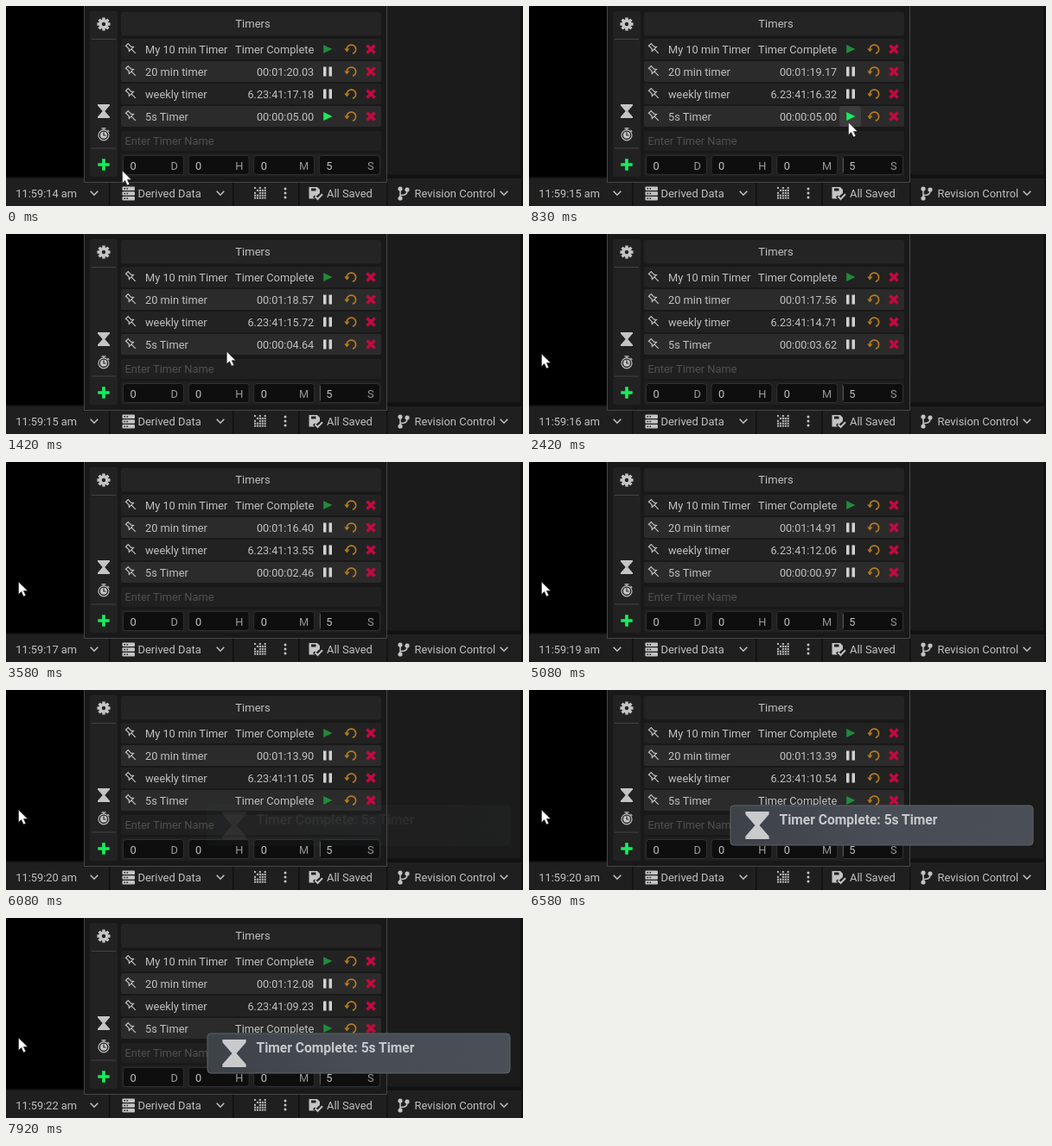
Animation of 598x232 px, one loop 8000 ms. Source, as an HTML page:

```html
<!DOCTYPE html>
<html lang="en">
<head>
<meta charset="utf-8">
<title>Timers</title>
<style>
html, body { margin: 0; width: 100%; height: 100%; overflow: hidden; background: #000; }
svg { display: block; width: 598px; height: 232px; }
text { font: 12.8px Roboto, sans-serif; fill: #c0c0c0; white-space: pre; }
.end { text-anchor: end; }
.time { text-anchor: end; font-size: 12.65px; }
.mid { text-anchor: middle; font-size: 13px; }
.bar { font-size: 12.95px; }
.hint { fill: #505050; }
.unit { fill: #9a9a9a; text-anchor: end; }
.title { font-size: 15.6px; font-weight: 700; fill: #c6c8cb; }
.line { fill: none; stroke: #c0c0c0; stroke-width: 1.6; }
.thin { fill: none; stroke: #c0c0c0; stroke-width: 1.2; }
.icon { fill: #c4c4c4; }
</style>
</head>
<body>
<svg viewBox="0 0 598 232">
  <defs>
    <linearGradient id="toastFill">
      <stop offset="0" stop-color="#3d4148"/><stop offset=".5" stop-color="#484d55"/><stop offset="1" stop-color="#4a4f57"/>
    </linearGradient>
    <path id="hourglass" d="M-7-8H7V-6.4L1.3 0L7 6.4V8H-7V6.4L-1.3 0L-7-6.4Z"/>
    <path id="play" d="M-4.8-5L5.4 0L-4.8 5Z" stroke-linejoin="round"/>
    <path id="pause" d="M-5-5.5h3.5v11h-3.5zM1.5-5.5H5v11H1.5z"/>
    <path id="cross" d="M-4.5-4.5L4.5 4.5M4.5-4.5L-4.5 4.5" stroke="#c20a40" stroke-width="3.6"/>
    <g id="reset">
      <path d="M-4.8 .5A5.2 5.2 0 1 1 2 5.2" stroke="#b47c1c" fill="none" stroke-width="1.8"/>
      <path d="M-7.8-.4H-1.6L-4.7 3.6Z" fill="#b47c1c"/>
    </g>
    <path id="pin" class="thin" d="M-2.6-6.5H2.6M-1.8-6.5V-1.6L-3.6 .6H3.6L1.8-1.6V-6.5M0 .6V7.5" transform="rotate(-45)"/>
    <path id="chevron" class="line" d="M-4.3-2.2L0 2.2L4.3-2.2"/>
  </defs>
  <g id="scene"></g>
  <g id="toast">
    <rect x="233" y="134" width="350" height="46" rx="4" fill="url(#toastFill)" stroke="#5d6269"/>
    <use href="#hourglass" transform="translate(264 157) scale(1.95 2)" fill="#c8cacc"/>
    <text class="title" x="289.5" y="155.5">Timer Complete: 5s Timer</text>
  </g>
  <path id="cursor" d="M.5 0V14.5L3.7 11.5L6.3 17L8.9 15.8L6.4 10.4H11Z" fill="#fff" stroke="#222" stroke-width=".6"/>
</svg>
<script>
const LOOP = 8000, FPS = 12;
const START_LEFT = 78.94, END_LEFT = 73.94, WEEKLY_OFFSET = 2.85;
const DIM_GREEN = '#1f8b3b', GREEN = '#14ee5c';
const $ = id => document.getElementById(id);

const rect = (x, y, w, h, fill, extra = '') =>
  `<rect x="${x}" y="${y}" width="${w}" height="${h}" fill="${fill}" ${extra}/>`;
const label = (x, y, value, cls = '', id = '') =>
  `<text x="${x}" y="${y + 4.6}" class="${cls}" id="${id}">${value}</text>`;
const use = (name, x, y, extra = '') => `<use href="#${name}" x="${x}" y="${y}" ${extra}/>`;

function row(i, name, value, icon, color) {
  const y = 50 + i * 26;
  return rect(133, y - 12, 301, 24, i % 2 ? '#2b2b2b' : '#222', 'rx="2"') +
    (i === 3 ? rect(359, y - 12, 25, 24, '#3d3d3d', 'rx="3" id="hover"') : '') +
    use('pin', 144.5, y - .5) + label(161, y, name) +
    label(356.2, y, value, value ? 'end' : 'time', 'value' + i) +
    use(icon, 372, y, `fill="${color}" id="state${i}"`) +
    use('reset', 399, y) + use('cross', 422, y);
}

function field(i, unit) {
  const x = 135.5 + i * 75.6;
  return rect(x, 173.5, 70, 22, '#0e0e0e', 'rx="3" stroke="#303030"') +
    label(x + 8, 185.2, i === 3 ? 5 : 0) + label(x + 63.4, 185.2, unit, 'unit');
}

function gear(x, y) {
  const teeth = Array.from({ length: 8 }, (_, i) =>
    `<rect x="-1.7" y="-7.6" width="3.4" height="4" transform="rotate(${i * 45})"/>`).join('');
  return `<g class="icon" transform="translate(${x} ${y})">${teeth}
    <circle r="4" fill="none" stroke="#c4c4c4" stroke-width="3.6"/></g>`;
}

function stopwatch(x, y) {
  return `<g class="thin" transform="translate(${x} ${y})"><circle r="6" cy=".8"/>
    <circle class="icon" r="4" cy=".8" stroke="none"/><path d="M-2.5-7.2H2.5M0-7V-5M4.5-5L6.3-3.2"/>
    <path d="M0-2.5V1H2.5" stroke="#222"/></g>`;
}

function dataIcon(x, y) {
  return [0, 5.7, 11.4].map(d => rect(x, y + d, 14.5, 4.6, '#c4c4c4', 'rx="1"') +
    rect(x + 2, y + d + 1.6, 1.6, 1.5, '#222') + rect(x + 5, y + d + 1.6, 1.6, 1.5, '#222')).join('');
}

function dotsIcon(x, y) {
  let out = '';
  for (let r = 0; r < 5; r++) for (let c = 0; c < 5; c++)
    if (r > 2 || (r > 0 && c > 1) || (r + c) % 2 === 0)
      out += rect(x + c * 2.9, y + r * 2.9, 2.1, 2.1, '#b4b4b4');
  return out;
}

const saveIcon = `<path class="icon" d="M350.5 210H360L363 213V217L358.5 221L357 219.5L355 221.5L357 223.5H350.5Z"/>
  <path d="M353 211.5H358.5V214.5H353Z" fill="#222"/>
  <path class="line" d="M357.5 221L360.5 224L366 218.2" style="stroke-width:2"/>`;
const branchIcon = `<path class="line" d="M456 213V223M456 219.5C463 219.5 464 217.5 464 214"/>
  <g class="icon"><circle cx="456" cy="212" r="2.6"/><circle cx="456" cy="223" r="2.6"/><circle cx="464" cy="213" r="2.6"/></g>`;

$('scene').innerHTML = [
  rect(0, 0, 598, 232, '#111'), rect(0, 0, 92, 198, '#000'),
  rect(440, 0, 155, 195.5, '#1b1b1b'),
  rect(0, 200, 596, 32, '#1f1f1f'),
  [119, 262, 338, 440].map(x => rect(x, 204, 1.5, 28, '#111')).join(''),
  label(11.3, 217.3, '', '', 'clock'), use('chevron', 102, 217),
  dataIcon(134.5, 209.5), label(152.5, 217.3, 'Derived Data', 'bar'), use('chevron', 248, 217),
  dotsIcon(287, 210),
  [212, 217, 222].map(y => `<circle class="icon" cx="323" cy="${y}" r="1.5"/>`).join(''),
  saveIcon, label(371, 217.3, 'All Saved', 'bar'),
  branchIcon, label(472.5, 217.3, 'Revision Control', 'bar'), use('chevron', 576, 217),

  rect(90.5, -1, 350, 205.5, '#191919', 'stroke="#454545"'),
  rect(97, 6, 32, 192, '#222', 'rx="3"'),
  rect(99, 38, 28, 1, '#444'), rect(99, 164.5, 28, 1, '#444'),
  gear(113, 21), use('hourglass', 113, 122, 'class="icon"'), stopwatch(113, 149),
  `<path d="M113 177.3V190.7M106.3 184H119.7" stroke="${GREEN}" stroke-width="3.7"/>`,
  rect(133, 7, 301, 27.5, '#242424', 'rx="3"'), label(285.5, 20.5, 'Timers', 'mid'),
  row(0, 'My 10 min Timer', 'Timer Complete', 'play', DIM_GREEN),
  row(1, '20 min timer', '', 'pause', '#d0d0d0'),
  row(2, 'weekly timer', '', 'pause', '#d0d0d0'),
  row(3, '5s Timer', '', 'play', GREEN),
  rect(133, 145, 301, 23, '#202020', 'rx="3"'),
  label(137.5, 156.5, 'Enter Timer Name', 'hint'),
  rect(133, 171, 301, 27, '#202020', 'rx="3"'),
  ['D', 'H', 'M', 'S'].map((u, i) => field(i, u)).join(''),
  rect(363, 176, 1, 17, '#555', 'id="caret"')
].join('');

// [time, seconds left on the 20 min timer]
const leftSteps = [[0, 80.03], [830, 79.17], [2420, 77.56], [3580, 76.4],
  [5080, 74.91], [6580, 73.39], [7920, 72.08], [8000, 72]];
// [time, x, y]
const cursorSteps = [[0, 134, 191], [80, 134, 191], [750, 369, 135],
  [1170, 369, 135], [1830, 14, 139], [8000, 14, 139]];

const linear = p => p;
const smooth = p => p * p * (3 - 2 * p);
function sample(steps, t, ease = linear) {
  const i = Math.max(1, steps.findIndex(s => s[0] >= t));
  const a = steps[i - 1], b = steps[i];
  const p = ease((t - a[0]) / (b[0] - a[0]));
  return a.slice(1).map((v, k) => v + (b[k + 1] - v) * p);
}

function clockText(prefix, seconds) {
  const cs = Math.round(seconds * 100);
  const pad = n => String(n).padStart(2, '0');
  const minutes = Math.floor(cs / 6000);
  return prefix(pad(minutes)) + pad(Math.floor(cs / 100) % 60) + '.' + pad(cs % 100);
}

function render(now) {
  const frame = Math.floor((now % LOOP + 5) * FPS / 1000) % (LOOP * FPS / 1000);
  const t = Math.round(frame * 100 / FPS) * 10;
  const [left] = sample(leftSteps, t);
  const [x, y] = sample(cursorSteps, t, smooth);
  const running = left < START_LEFT, done = left <= END_LEFT;
  const shortLeft = Math.min(5, left - END_LEFT + .004);

  $('clock').textContent = `11:59:${14 + Math.floor((t + 300) / 1000)} am`;
  $('value1').textContent = clockText(m => `00:${m}:`, left);
  $('value2').textContent = clockText(() => '6.23:41:', left - WEEKLY_OFFSET);
  $('value3').textContent = done ? 'Timer Complete' : clockText(m => `00:${m}:`, shortLeft);
  $('value3').setAttribute('class', done ? 'end' : 'time');
  $('state3').setAttribute('href', running && !done ? '#pause' : '#play');
  $('state3').setAttribute('fill', done ? DIM_GREEN : running ? '#d0d0d0' : GREEN);
  $('hover').style.opacity = +(x >= 359 && x < 384 && y > 116 && y < 140);
  $('caret').style.opacity = +(t > 0);
  $('toast').style.opacity = Math.min(1, Math.max(0, (t - 6040) / 420));
  $('cursor').setAttribute('transform', `translate(${x} ${y})`);
}

const begin = performance.now();
function tick() {
  render(performance.now() - begin);
  requestAnimationFrame(tick);
}
tick();
</script>
</body>
</html>
```
